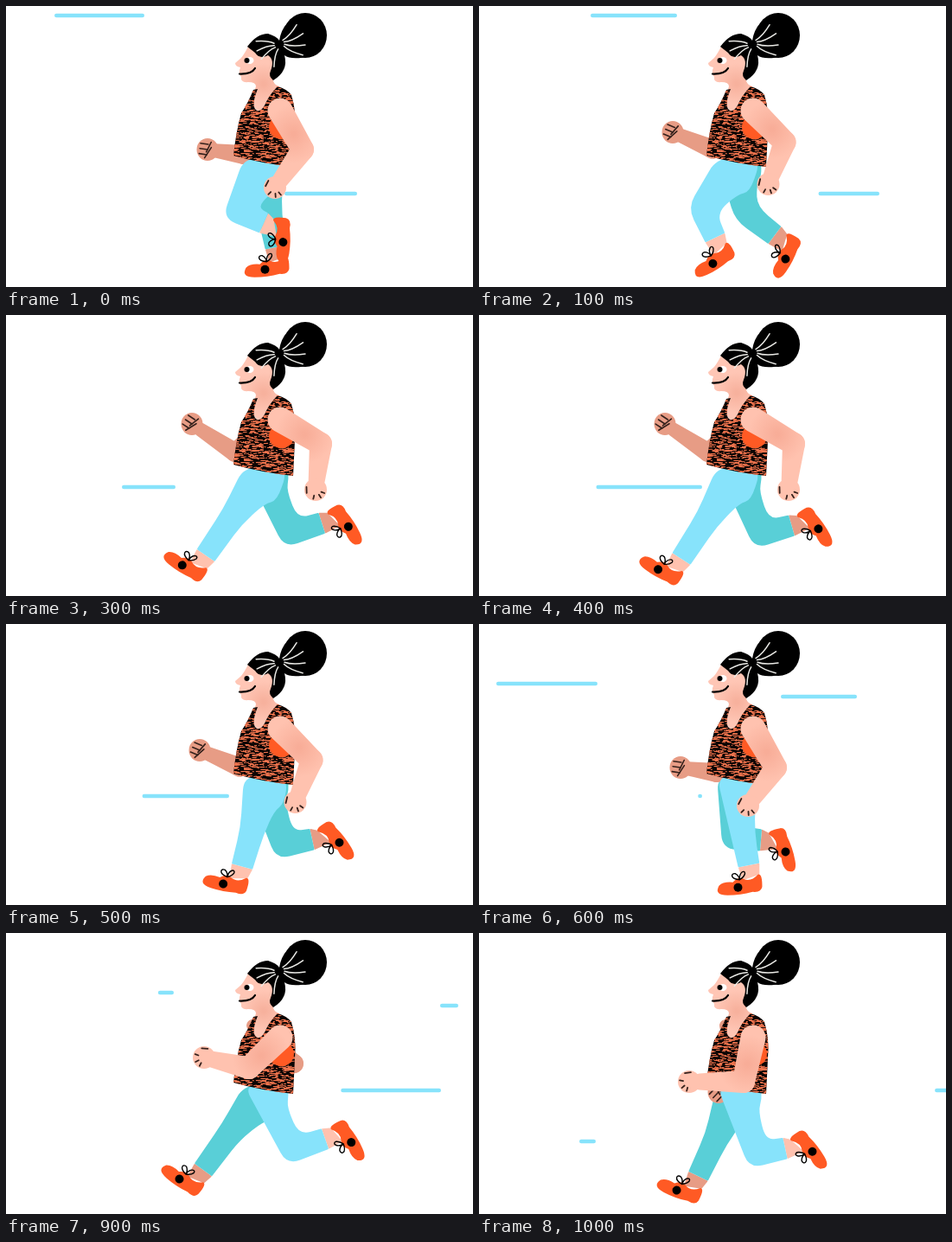
Recreate the animation shown at these times as an HTML page with a canvas. Size 540 by 325 pixels, loop 1100 ms.

```html
<!DOCTYPE html>
<html lang="en">
<head>
<meta charset="utf-8">
<title>Runner</title>
<style>
html, body { margin: 0; width: 100%; height: 100%; overflow: hidden; background: #fff; }
canvas { display: block; }
</style>
</head>
<body>
<canvas id="stage" width="540" height="325"></canvas>
<script>
const ctx = document.getElementById('stage').getContext('2d');
const STEP = 100, COUNT = 11;
const BLUE = '#87e3fb', TEAL = '#59cfd7', ORANGE = '#ff5a24', INK = '#000', LINE = '#35211c';
const SKIN = '#ffc2af', BLUSH = '#f8ad98', SHADE = '#e79c85';
const HIP = [301, 192], SHOULDER = [317, 121];

// One stride, shared by both legs: knee, trouser cuff, foot angle.
const stride = [
  [[271, 239], [298, 251], -81],   // lift
  [[258, 236], [273, 268], -25],   // swing
  [[260, 230], [228, 274], 41],    // reach
  [[264, 236], [234, 282], 37],    // land
  [[305, 243], [312, 279], 0],     // stand
  [[309, 240], [342, 265], -55],   // push
  [[332, 251], [369, 238], -114],  // kick
  [[322, 256], [354, 249], -120]   // trail
];
// Place in the stride at each step.
const nearPhase = [0, 1, 2, 2.5, 3, 3.5, 4, 4.5, 5, 6, 7];
const farPhase = [4, 5, 6, 6.25, 6.5, 7, 7.5, 8.2, 9, 10, 11.25];

// Near elbow and hand, then far shoulder, elbow and hand.
const low = [[343, 166], [311, 210], [292, 130], [275, 172], [233, 166]];
const back = [[364, 149], [358, 202], [292, 130], [265, 159], [215, 126]];
const front = [[306, 172], [243, 172], [285, 107], [300, 160], [277, 184]];
const high = [[281, 156], [229, 144], [285, 107], [333, 151], [305, 160]];

const lerp = (a, b, t) => Array.isArray(a) ? a.map((v, i) => lerp(v, b[i], t)) : a + (b - a) * t;
const lowBack = lerp(low, back, .5);
const arms = [low, lowBack, back, back, back, lowBack, low, lerp(low, front, .5), front, high, front];

// The tail eases from start to end within life steps; the head runs ahead by len per step.
const streaks = [
  { y: 11, first: 0, start: 56, end: 229, len: 104, life: 2.37, power: 1 },
  { y: 217, first: 0, start: 322, end: 463, len: 84, life: 2, power: 1 },
  { y: 199, first: 3, start: 134, end: 258, len: 62, life: 3.03, power: 4 },
  { y: 69, first: 6, start: 20, end: 194, len: 117, life: 3.35, power: 1 },
  { y: 84, first: 6, start: 349, end: 523, len: 88, life: 3.2, power: 2 },
  { y: 182, first: 8, start: 385, end: 545, len: 59, life: 2.04, power: 6 },
  { y: 241, first: 10, start: 116, end: 135, len: 19, life: 1, power: 1 }
];

const polar = ([x, y], angle, r) => [x + r * Math.cos(angle), y + r * Math.sin(angle)];
const heading = ([x, y], [u, v]) => Math.atan2(v - y, u - x);
const rad = deg => deg * Math.PI / 180;

function fill(color) {
  ctx.fillStyle = color;
  ctx.fill();
}

// Closed outline with softened corners; radius(i) sets each corner.
function blob(pts, color, radius) {
  const n = pts.length;
  ctx.beginPath();
  pts.forEach((p, i) => {
    const toward = q => {
      const d = Math.hypot(q[0] - p[0], q[1] - p[1]) || 1;
      return lerp(p, q, Math.min(radius(i), d / 2) / d);
    };
    ctx.lineTo(...toward(pts[(i + n - 1) % n]));
    ctx.quadraticCurveTo(...p, ...toward(pts[(i + 1) % n]));
  });
  ctx.closePath();
  fill(color);
}

function shape(path, color) {
  ctx.fillStyle = color;
  ctx.fill(new Path2D(path));
}

function stroke(path, color, width) {
  ctx.strokeStyle = color;
  ctx.lineWidth = width;
  ctx.stroke(new Path2D(path));
}

function line(a, b, color, width) {
  stroke(`M${a}L${b}`, color, width);
}

function oval(x, y, rx, ry, color) {
  ctx.beginPath();
  ctx.ellipse(x, y, rx, ry, 0, 0, 7);
  fill(color);
}

// Tapered limb between two round joints.
function limb(p, r, q, s, color) {
  const a = heading(p, q), off = Math.acos((r - s) / Math.hypot(q[0] - p[0], q[1] - p[1]));
  ctx.beginPath();
  ctx.arc(...p, r, a + off, a - off + 2 * Math.PI);
  ctx.arc(...q, s, a - off, a + off);
  fill(color);
}

function glow([x, y], r, inner, outer) {
  const g = ctx.createRadialGradient(x, y, 2, x, y, r);
  g.addColorStop(0, inner);
  g.addColorStop(1, outer);
  return g;
}

function drawShoe() {
  shape('M-37 11Q-32 6-21 7Q-14 0-9 3Q0 7 8-2Q13-4 13 12Q12 19 2 18Q-12 22-27 22Q-43 22-37 11Z', ORANGE);
  oval(-15, 13, 5, 5, INK);
  stroke('M-13 4C-25 3-23-4-18-3Q-14-1-13 4C-14-5-7-8-7-3Q-8 1-13 4', INK, 1.4);
}

function drawLeg(phase, cloth, skin) {
  const key = Math.floor(phase);
  const [knee, cuff, deg] = lerp(stride[key % 8], stride[(key + 1) % 8], phase - key);
  const thigh = heading(HIP, knee), shin = heading(knee, cuff), side = Math.PI / 2;
  const mid = (thigh + shin) / 2 + side, bulge = 14 / Math.cos((thigh - shin) / 2);
  const ankle = polar(cuff, shin, 13), tilt = rad(deg);
  const hem = [polar(cuff, shin + side, 12.5), polar(cuff, shin - side, 12.5)];

  blob([...hem, polar(ankle, tilt - .2, 10), polar(ankle, tilt + 2.7, 11)], skin, () => 1);
  blob([[275, 176], polar(knee, mid, bulge), ...hem, polar(knee, mid, -bulge),
    polar(HIP, thigh - rad(40), 26), polar(HIP, thigh - rad(72), 26), [326, 178]],
    cloth, i => i === 2 || i === 3 ? 1 : 16);

  ctx.save();
  ctx.translate(...ankle);
  ctx.rotate(tilt);
  drawShoe();
  ctx.restore();
}

function drawFarArm([, , shoulder, elbow, hand]) {
  limb(shoulder, 7, elbow, 11, SHADE);
  limb(elbow, 11, lerp(elbow, hand, .8), 8, SHADE);
  oval(...hand, 12.5, 13, SHADE);
  ctx.save();
  ctx.translate(...hand);
  ctx.rotate(heading(elbow, hand));
  for (const y of [-6, 0, 6]) line([0, y], [9, y], LINE, 1.6);
  line([2, -10], [-4, 3], LINE, 1.6);
  line([1, -3], [-3, 9], LINE, 1.6);
  ctx.restore();
}

function drawNearArm([elbow, hand]) {
  const color = glow(lerp(SHOULDER, elbow, .6), 34, BLUSH, SKIN);
  const aim = heading(elbow, hand);
  limb(SHOULDER, 14.5, elbow, 13, color);
  limb(elbow, 13, lerp(elbow, hand, .8), 9.5, color);
  oval(...hand, 13, 13, SKIN);
  for (const deg of [8, -40, -75]) {
    const a = aim + rad(deg);
    line(polar(hand, a, 7), polar(hand, a, 11), LINE, 1.8);
  }
  line(polar(hand, aim + 1.1, 11), polar(hand, aim + 1.75, 11), LINE, 1.8);
}

const weave = (() => {
  let seed = 7, d = '';
  const rnd = () => (seed = seed * 16807 % 2147483647) / 2147483647;
  for (let i = 0; i < 1000; i++) {
    const x = 260 + rnd() * 74, y = 93.5 + Math.floor(rnd() * 94);
    d += `M${x} ${y}l${1 + rnd() * 6} ${rnd() - .5}`;
  }
  return d;
})();

function drawShirt() {
  ctx.save();
  ctx.clip(new Path2D(`M286 97L291 96Q284 113 288 119Q293 125 299 115
    Q304 103 314 93Q325 96 330 103Q336 122 334 145L332 186
    Q295 182 263 173Q266 145 272 124Q280 112 286 97Z`));
  ctx.fillStyle = '#0b0504';
  ctx.fillRect(255, 90, 90, 100);
  ctx.lineCap = 'butt';
  stroke(weave, '#f4764f', 1);
  ctx.restore();
}

function drawHead() {
  shape(`M281 45Q276 55 272 60L265 66Q265 70 271 71Q268 78 272 82Q271 89 280 88
    Q289 88 289 93Q284 108 285 114Q292 127 300 117Q306 102 316 93Q306 90 310 78L312 55L295 40Z`,
    glow([298, 90], 24, '#f7b19d', '#ffc6b5'));
  shape(`M279 47Q290 32 303 32Q313 35 316 40Q320 15 345 9L352 58Q330 63 322 57
    Q327 75 309 86Q303 81 306 75Q311 62 303 57Q293 62 288 54Z`, INK);
  oval(346, 34, 25, 26, INK);
  // Strands fan out from the hair tie.
  const tie = [316, 44];
  for (const deg of [-48, -24, 2, 25, 103, 140, 163, 187]) {
    const a = rad(deg), len = Math.abs(deg) < 90 ? 30 : 27;
    stroke(`M${polar(tie, a, 6)}Q${polar(tie, a + .2, len / 2)} ${polar(tie, a, len)}`, '#e9e9e5', 1.5);
  }
  oval(282, 63, 4.5, 4, '#fff');
  oval(278.5, 63, 3, 3, INK);
  stroke('M270 78.5Q284 79 288 72', INK, 2.2);
}

function drawStreaks(step) {
  for (const { y, first, start, end, len, life, power } of streaks) {
    const k = step - first;
    if (k < 0 || k >= life) continue;
    const tail = start + (end - start) * (k / life) ** power;
    const head = Math.min(end, start + len * (k + 1));
    line([tail + 2.3, y], [Math.max(tail, head - 2.3), y], BLUE, 4.6);
  }
}

function draw() {
  const step = Math.floor(performance.now() / STEP) % COUNT;
  ctx.fillStyle = '#fff';
  ctx.fillRect(0, 0, 540, 325);
  ctx.lineCap = ctx.lineJoin = 'round';
  drawStreaks(step);
  drawLeg(farPhase[step], TEAL, SHADE);
  drawFarArm(arms[step]);
  drawLeg(nearPhase[step], BLUE, SKIN);
  drawHead();
  drawShirt();
  oval(318.5, 140, 14.5, 14, ORANGE);
  drawNearArm(arms[step]);
  requestAnimationFrame(draw);
}
draw();
</script>
</body>
</html>
```
